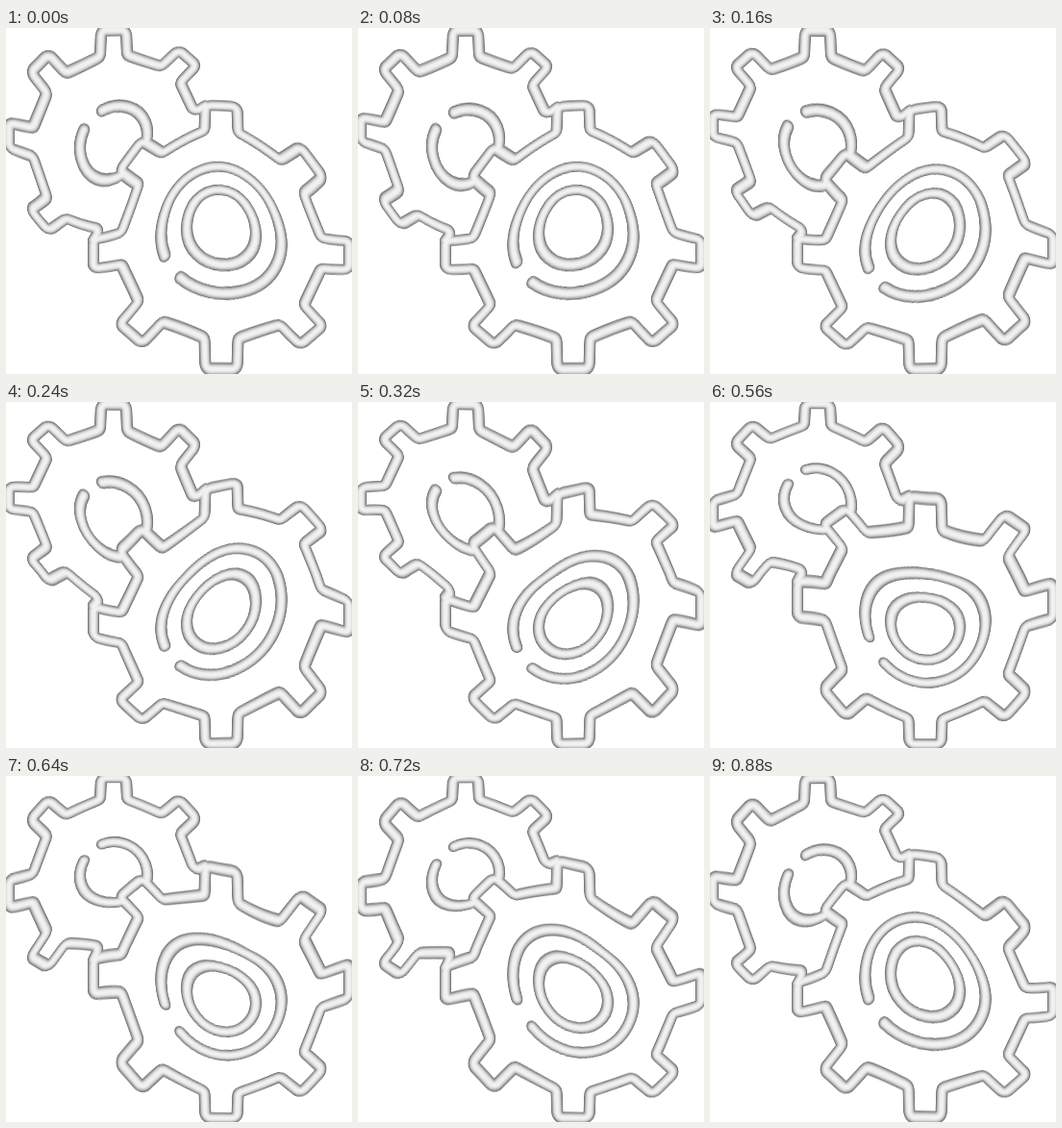
These frames come from a looping animation (360x360 px, 960 ms). An HTML page with a canvas:

```html
<!DOCTYPE html>
<html lang="en">
<head>
<meta charset="utf-8">
<title>Wavy gears</title>
<style>
  html, body { margin: 0; width: 100%; height: 100%; overflow: hidden; background: #fff; }
  canvas { display: block; width: 360px; height: 360px; }
</style>
</head>
<body>
<canvas id="stage" width="360" height="360"></canvas>
<script>
const SIZE = 360, HALF = SIZE / 2;
const LOOP = 960, STEP = 80, AMPLITUDE = 20, WAVE = 45;
const LINE = 12, CORNER = 6;
const rad = deg => deg * Math.PI / 180;

const big = { x: 224, y: 222.5, root: 104, tip: 133, half: 16.5 };
const small = { x: 112, y: 111, root: 84, tip: 109, half: 13 };

// Four corners of the tooth at an angle, clockwise
function tooth(gear, deg) {
  const c = Math.cos(rad(deg)), s = Math.sin(rad(deg));
  const at = (r, side) => [gear.x + r * c - side * s, gear.y + r * s + side * c];
  const { root, tip, half } = gear;
  return [at(root, -half - 1), at(tip, -half), at(tip, half), at(root, half + 1)];
}

function addLine(path, points) {
  path.moveTo(...points[0]);
  for (let i = 1; i < points.length - 1; i++) {
    path.arcTo(...points[i], ...points[i + 1], CORNER);
  }
  path.lineTo(...points[points.length - 1]);
}

function addArc(path, gear, r, from, to) {
  const a = rad(from);
  path.moveTo(gear.x + r * Math.cos(a), gear.y + r * Math.sin(a));
  path.arc(gear.x, gear.y, r, a, rad(to), to < from);
}

function gearsPath() {
  const path = new Path2D();
  const outline = [0, 45, 90, 135, 180, 225, 270, 315].flatMap(a => tooth(big, a));
  const first = outline[0], last = outline[outline.length - 1];
  const seam = [(first[0] + last[0]) / 2, (first[1] + last[1]) / 2];
  addLine(path, [seam, ...outline, seam]);
  addArc(path, big, 36, 0, 360);
  addArc(path, big, 62.5, 160, 493);

  // The small gear ends at the corners of two big teeth
  const visible = [135, 180, 225, 270, 315].flatMap(a => tooth(small, a));
  addLine(path, [
    tooth(big, 180)[2], tooth(small, 90)[3], ...visible, tooth(small, 0)[0], tooth(big, 270)[1]
  ]);
  addArc(path, small, 35, 208, 75);
  addArc(path, small, 35, 250, 375);
  return path;
}

// Flat drawing: stacked strokes shade from dark edges to a pale core
const flat = document.createElement('canvas');
flat.width = flat.height = SIZE;
const pen = flat.getContext('2d');
pen.fillStyle = '#fff';
pen.fillRect(0, 0, SIZE, SIZE);
pen.lineCap = pen.lineJoin = 'round';
const gears = gearsPath();
for (let w = LINE; w > 0; w -= 0.5) {
  const grey = Math.round(242 - 145 * (w / LINE) ** 2.6);
  pen.strokeStyle = `rgb(${grey},${grey},${grey})`;
  pen.lineWidth = w;
  pen.stroke(gears);
}

const ctx = document.getElementById('stage').getContext('2d');

// Each column stretches about its middle, which rides a travelling sine wave
function draw(time) {
  const phase = Math.floor(time % LOOP / STEP) * STEP / LOOP * 2 * Math.PI;
  for (let x = 0; x < SIZE; x++) {
    const middle = HALF - AMPLITUDE * Math.sin(x / WAVE - phase);
    ctx.drawImage(flat, x, 0, 1, middle, x, 0, 1, HALF);
    ctx.drawImage(flat, x, middle, 1, SIZE - middle, x, HALF, 1, HALF);
  }
}

const start = performance.now();
function tick() {
  draw(performance.now() - start);
  requestAnimationFrame(tick);
}
tick();
</script>
</body>
</html>
```
